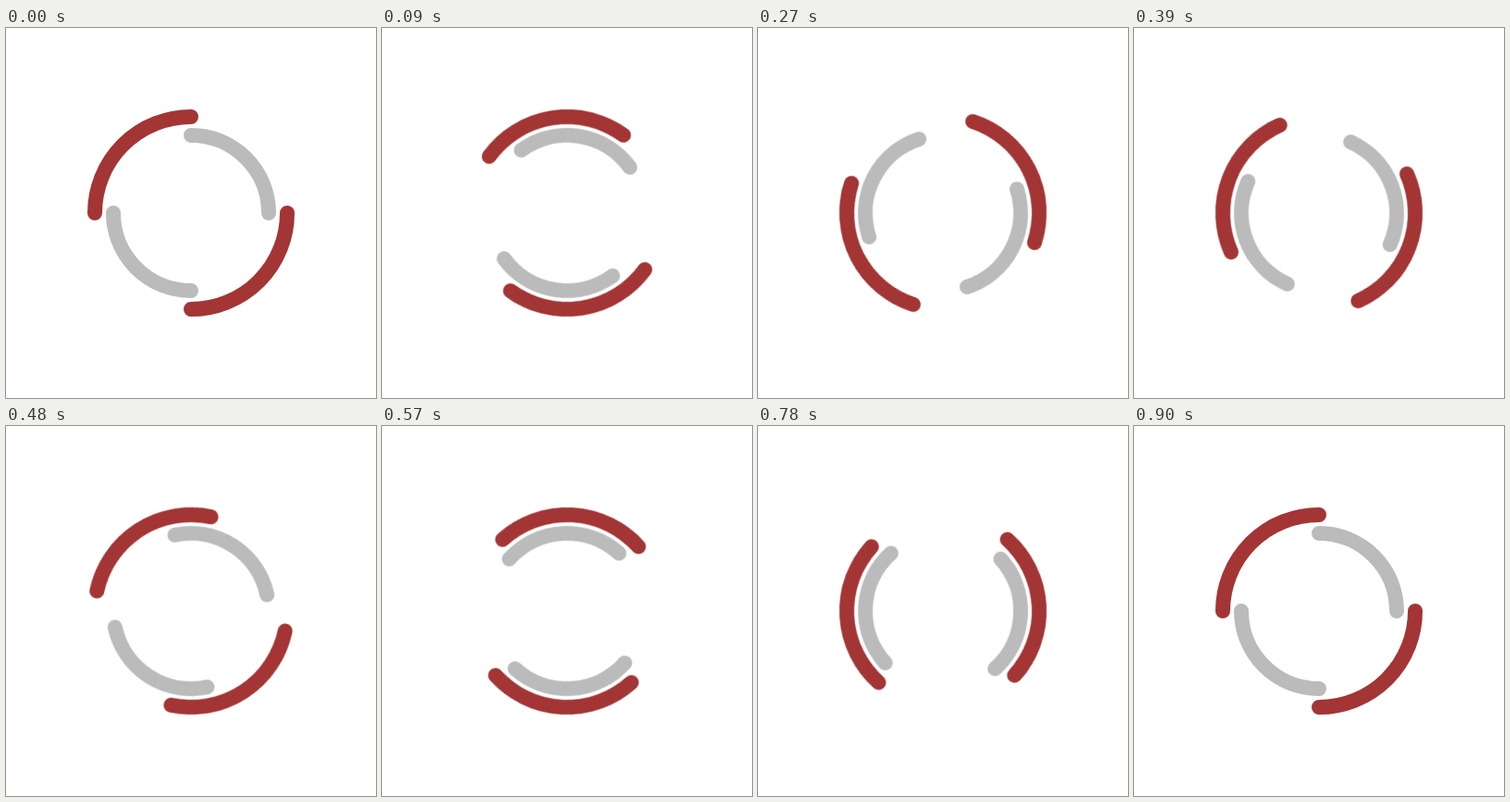
Write an HTML page that moves like this. It is 400 by 400 pixels and loops after 0.93 s.

```html
<!DOCTYPE html>
<html lang="en">
<head>
<meta charset="utf-8">
<title>Double ring spinner</title>
<style>
  html, body { margin: 0; width: 100%; height: 100%; overflow: hidden; background: #fff; }
  svg { display: block; width: 100vw; height: 100vh; }
  path { fill: none; stroke-width: 16; stroke-linecap: round; }
  .ring { transform-origin: 200px 200px; animation: turn 930ms infinite; }
  .outer { --turn: 360deg; stroke: #a33535; }
  .inner { --turn: -360deg; stroke: #bbb; }
  /* 30 steps of 30 ms, then the closing pose rests for one more */
  @keyframes turn {
    0% { transform: rotate(0deg); animation-timing-function: steps(30, end); }
    96.77%, 100% { transform: rotate(var(--turn)); }
  }
</style>
</head>
<body>
<svg viewBox="0 0 400 400">
  <g class="ring outer">
    <path d="M96 200A104 104 0 0 1 200 96M304 200A104 104 0 0 1 200 304"/>
  </g>
  <g class="ring inner">
    <path d="M200 116A84 84 0 0 1 284 200M200 284A84 84 0 0 1 116 200"/>
  </g>
</svg>
</body>
</html>
```
